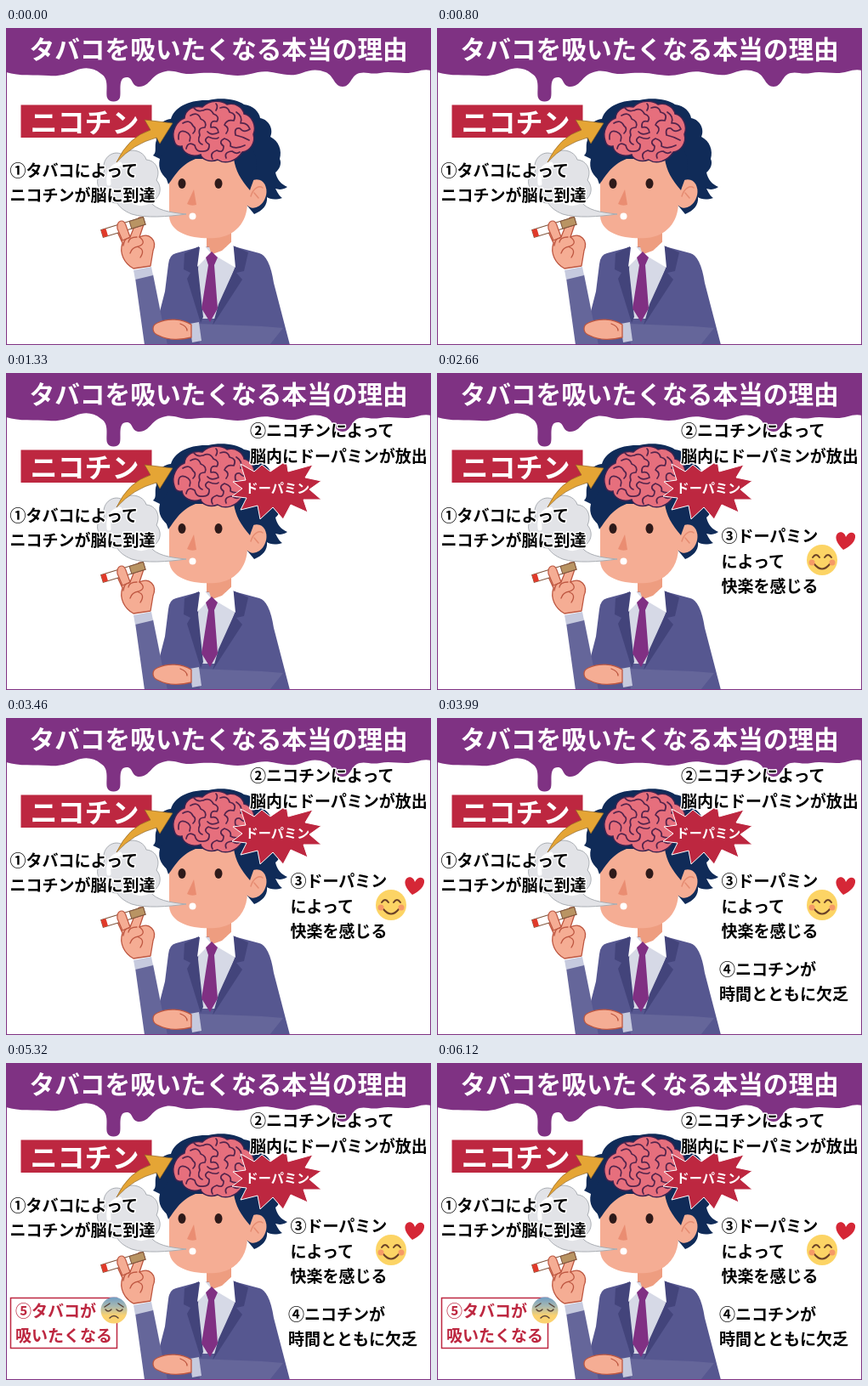
An HTML page that plays this animation: 500 px wide and 373 px high, repeating every 6650 ms.

```html
<!DOCTYPE html>
<html lang="ja">
<head>
<meta charset="utf-8">
<style>
html, body { margin: 0; width: 100%; height: 100%; overflow: hidden; background: #fff; }
svg { display: block; width: 100vw; height: 100vh; }
text { font: 700 19px "Noto Sans CJK JP", "Noto Sans CJK", sans-serif; }
.note { fill: #000; stroke: #fff; stroke-width: 3; stroke-linejoin: round; paint-order: stroke; }
.red { fill: #bd2740; }
.white { fill: #fff; }
.line { fill: none; stroke-linecap: round; stroke-linejoin: round; }
.step { visibility: hidden; }
</style>
</head>
<body>
<svg viewBox="0 0 500 373">
<defs>
  <linearGradient id="worry" x1="0" y1="0" x2="0" y2="1">
    <stop offset="0" stop-color="#6f9dc4"/><stop offset=".35" stop-color="#a9b9b0"/><stop offset=".7" stop-color="#fbd270"/>
  </linearGradient>
</defs>

<!-- dripping header -->
<path fill="#7f3283" d="M0 0H500V50C490 47 482 53 470 53C458 53 450 51 440 53C428 55 424 51 416 53C406 55 406 69 396 69C386 69 386 56 376 52C366 48 358 49 348 53C338 57 328 55 318 53C306 50 298 51 288 54C276 57 266 56 254 54C240 52 230 53 218 54C206 55 198 49 188 51C170 54 170 69 157 69C147 69 150 58 142 58C131 58 136 75 134 82C132 88 121 88 119 82C117 74 122 60 112 54C102 46 92 46 82 50C70 55 62 57 50 56C34 55 16 57 0 52Z"/>
<text x="27.500" y="35.500" class="white" style="font-size:29.700px">タバコを吸いたくなる本当の理由</text>

<!-- hair, neck, ear, face -->
<path fill="#102b58" d="M192 180C184 174 178 166 181 154L173 150C178 146 174 139 177 132C175 117 183 108 194 107C198 93 216 84 238 85C253 81 272 84 280 90C291 91 298 99 299 106C310 108 315 120 311 128C321 133 325 144 322 154C325 160 321 167 317 170C319 179 324 184 331 187C325 191 320 190 317 189C320 195 322 198 325 200C316 203 310 201 307 199C308 208 302 215 292 219L278 202Z"/>
<path fill="#ee9d80" d="M236 230H265V258L252 270L236 264Z"/>
<ellipse cx="293" cy="195" rx="13" ry="17" fill="#f5ad94" transform="rotate(18 293 195)"/>
<path class="line" stroke="#e58c72" stroke-width="1.500" d="M288 198C291 188 298 185 302 188M292 194L297 200"/>
<path fill="#f5ad94" d="M192 150H272L284 175V205C284 229 269 245 247 247C222 249 194 243 192 222Z"/>
<path fill="#102b58" d="M191 184C197 177 204 161 223 154H268C270 168 276 178 287 191C293 174 300 161 290 143L252 118L198 130L181 154Z"/>
<ellipse cx="207" cy="183" rx="4.500" ry="6" fill="#2e1a1a"/>
<ellipse cx="250" cy="183" rx="4.500" ry="6" fill="#2e1a1a"/>
<path fill="#ea8d72" d="M221 190L213 207Q218 210 224 208Z"/>

<!-- suit -->
<path fill="#565790" d="M226 258L200 265Q192 267 191 278L187 310L178 345V373H334L315 300Q310 268 298 265L268 257Z"/>
<path fill="#65669a" d="M152 294L173 290L183 340L190 373H163Z"/>
<path fill="#d6d9e6" d="M229 258L268 258L269 283L246 342H231L225 283Z"/>
<path fill="#43447b" d="M227 257L210 265L209 284L217 288L213 295L229 347L232 340L226 284ZM267 256L285 264L280 286L271 288L278 296L243 350L250 325L269 283Z"/>
<path fill="#ee9d80" d="M236 248L265 250L252 266L242 267Z"/>
<path fill="#fff" d="M229 251L225 281L241 265ZM267 250L270 282L243 266L254 262Z"/>
<path fill="#803083" d="M235 270L242 263L249 270L245 279L249 330L240 346L230 330L238 279Z"/>
<path fill="#65669a" d="M226 348L301 351L326 353L310 373H228Z"/>
<path fill="#c6cade" d="M216 348L227 346L230 368L219 370Z"/>
<path fill="#c6cade" d="M150 285L171 281L173 291L152 296Z"/>
<g fill="#f5ad94" stroke="#bd5640" stroke-width="1.300" stroke-linejoin="round">
  <path d="M218 349C207 342 190 341 178 347C171 350 171 359 180 362C191 368 207 367 218 364Z"/>
  <path class="line" d="M205 348Q213 351 213 356"/>
  <path d="M150 283C139 277 133 265 137 253L131 240C129 232 137 228 140 235L146 246L154 226C157 220 164 223 162 231L157 246C169 240 178 250 173 262L170 280Z"/>
  <path class="line" d="M145 247Q139 247 138 256M154 246Q145 246 144 252M157 246Q166 253 156 257Q148 258 146 265M156 258Q164 261 158 270"/>
</g>
<g transform="translate(113 242) rotate(-17)" stroke="#80553c">
  <rect y="-4.500" width="52" height="9" fill="#fff"/>
  <rect y="-4.500" width="6" height="9" fill="#e03a2a" stroke="none"/>
  <rect x="35" y="-4.500" width="17" height="9" fill="#b99463"/>
</g>
<path fill="#f5ad94" stroke="#bd5640" stroke-width="1.200" d="M137 250L131 236C130 226 138 224 141 232L146 246Z"/>

<!-- smoke -->
<path fill="#e2e3e7" stroke="#a9adb3" d="M212 219C190 222 164 224 148 219C138 215 133 210 131 206C121 206 115 200 115 192C104 188 106 172 116 169C111 155 125 142 137 149C145 140 162 144 165 155C177 156 182 168 177 179C186 190 179 202 170 205C177 214 191 217 212 219Z"/>
<path class="line" stroke="#fff" stroke-width="5" d="M121 183Q119 164 134 160M149 203Q159 210 168 204"/>
<circle cx="219.500" cy="221.500" r="4" fill="#fff"/>

<!-- brain -->
<path fill="#e66f7d" stroke="#3a2350" stroke-width="1.500" d="M198 133C194 121 201 109 210 106C211 95 222 91 231 93C240 84 254 85 260 90C270 87 279 94 280 101C290 103 295 116 291 125C294 135 287 145 278 146C271 157 258 161 249 155C239 159 230 154 229 149C218 153 208 147 207 139C202 140 199 138 198 133Z"/>
<g class="line" stroke="#54244c" stroke-width="1.700">
  <path d="M203 131Q202 119 211 122Q219 125 216 133M208 112Q216 107 220 115Q225 119 220 124M217 103Q226 98 229 107Q237 110 234 117Q225 117 228 126Q224 134 231 137"/>
  <path d="M232 97Q240 93 244 101Q252 104 248 110Q240 108 241 117Q249 115 250 123Q241 127 237 122M252 94Q261 91 263 99Q272 101 268 109Q260 107 257 114Q264 118 259 124"/>
  <path d="M271 99Q279 104 276 112Q284 111 287 119Q280 124 275 118Q268 117 270 126Q279 128 286 132M212 142Q214 133 222 138Q224 146 230 145Q240 146 239 137Q231 132 238 128Q247 132 250 129"/>
  <path d="M243 154Q239 147 248 144Q256 148 256 139Q249 134 257 130Q266 133 264 139Q271 143 281 138M259 153Q256 146 266 145Q271 149 275 146M221 94Q225 99 231 97M247 89Q250 92 247 97"/>
</g>

<!-- nicotine label, arrow, first note -->
<rect x="17.500" y="90.500" width="154" height="38.500" fill="#bd2740"/>
<text x="28.500" y="122.500" class="white" style="font-size:32px">ニコチン</text>
<path fill="#e5a535" stroke="#8e6425" stroke-width=".7" d="M130 158Q144 128 170 120L163 108L196 112L181 136L177 129Q150 136 130 158Z"/>
<text class="note" x="4.500" y="175">①タバコによって</text>
<text class="note" x="4.500" y="204">ニコチンが脳に到達</text>

<g class="step">
  <path class="red" stroke="#fff" d="M276 107L292 116L301 108L311 116L330 103L332 116L361 108L352 123L371 127L357 137L371 149L350 149L355 164L335 155L326 172L314 158L299 172L296 156L276 161L283 147L266 145L278 136L267 128L282 126Z"/>
  <text class="white" x="281.500" y="141" style="font-size:15.200px">ドーパミン</text>
  <text class="note" x="287" y="75">②ニコチンによって</text>
  <text class="note" x="287" y="104.500">脳内にドーパミンが放出</text>
</g>

<g class="step">
  <text class="note" x="334.500" y="199">③ドーパミン</text>
  <text class="note" x="334.500" y="228.500">によって</text>
  <text class="note" x="334.500" y="258">快楽を感じる</text>
  <circle cx="453" cy="220" r="18" fill="#fcd465"/>
  <g class="line" stroke="#6b4228" stroke-width="2">
    <path d="M442 217Q446 211 450 217M456 217Q460 211 464 217M444 225Q453 236 462 225"/>
  </g>
  <g fill="#f59a66"><circle cx="441" cy="223" r="3.500"/><circle cx="465" cy="223" r="3.500"/></g>
  <path fill="#d52736" d="M478 208C471 201 467 194 471 189C475 185 480 188 481 193C484 187 490 186 492 191C493 198 486 204 478 208Z"/>
</g>

<g class="step">
  <text class="note" x="332" y="303">④ニコチンが</text>
  <text class="note" x="332" y="332">時間とともに欠乏</text>
</g>

<g class="step">
  <rect x="5.500" y="276.500" width="125" height="59" fill="#fff" stroke="#bd2740" stroke-width="1.500"/>
  <text class="red" x="11" y="299">⑤タバコが</text>
  <text class="red" x="11" y="328">吸いたくなる</text>
  <circle cx="127" cy="291" r="15.500" fill="url(#worry)"/>
  <g class="line" stroke="#594238" stroke-width="1.500">
    <path d="M116 287L122 283M132 283L138 287M117 290Q120 294 124 290M130 290Q134 294 137 290M122 300Q127 295 132 300"/>
  </g>
</g>

<rect x=".5" y=".5" width="499" height="372" fill="none" stroke="#7f3283"/>
</svg>
<script>
const steps = document.querySelectorAll('.step');
const HOLD = 1330, LOOP = 6650;
const start = performance.now();

function draw(now) {
  const time = Math.max(0, now - start) % LOOP;
  steps.forEach((step, i) => {
    step.style.visibility = time >= (i + 1) * HOLD ? 'visible' : 'hidden';
  });
  requestAnimationFrame(draw);
}
draw(start);
</script>
</body>
</html>
```
